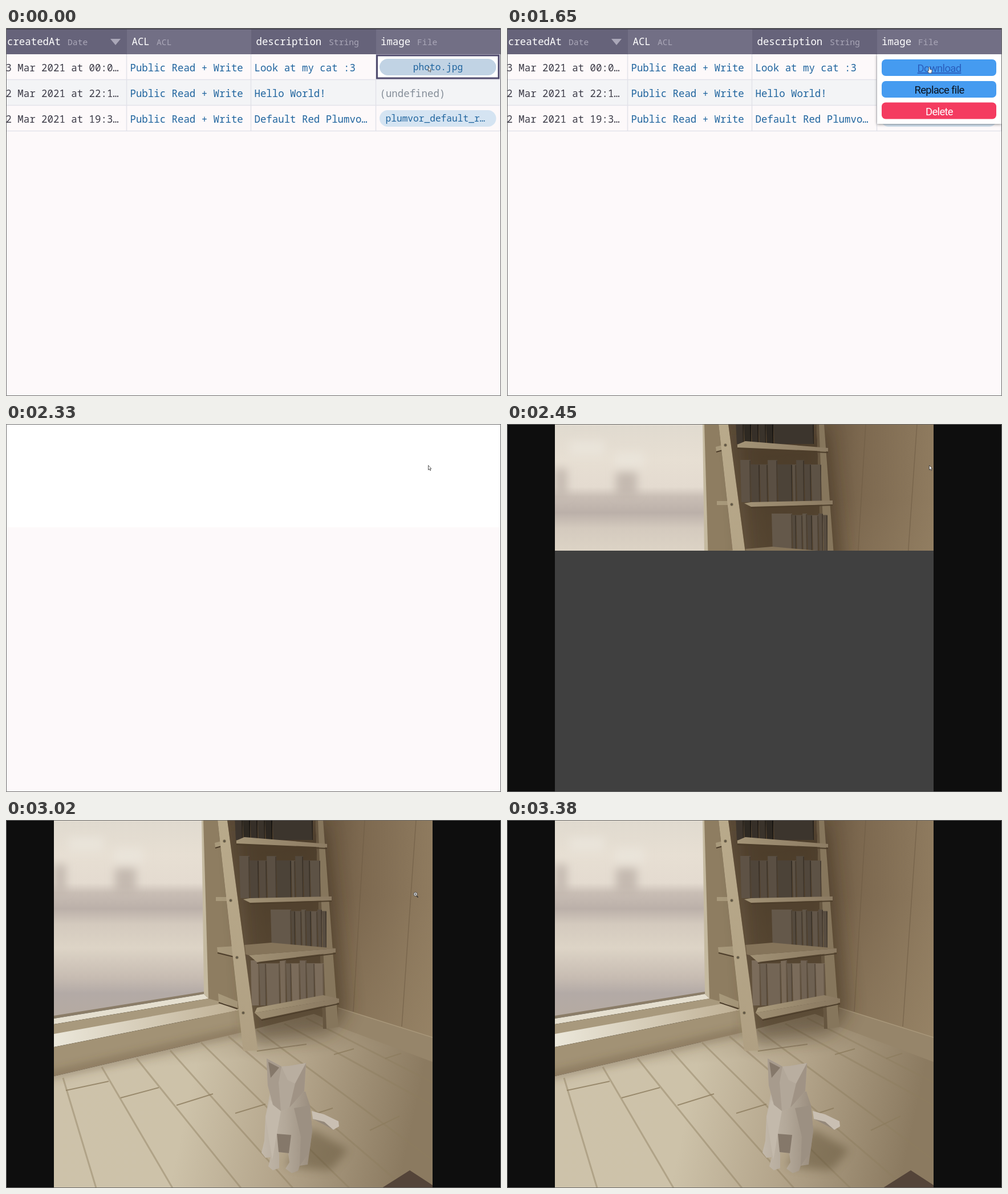
Write an HTML page that moves like this. It is 868 by 645 pixels and loops after 4.41 s.

```html
<!DOCTYPE html>
<html lang="en">
<head>
<meta charset="utf-8">
<title>File column preview</title>
<style>
html, body { margin: 0; width: 100%; height: 100%; overflow: hidden; background: #fdf9fa; }
svg { display: block; width: 100%; height: 100%; }
text { font: 17.4px "Noto Sans Mono", monospace; fill: #1f649e; white-space: pre; }
.head text { fill: #fff; font-weight: 500; }
.head .type { font-size: 14.7px; font-weight: 400; fill: #aaa7b8; }
.date { fill: #3d3c48; }
.none { fill: #848d98; }
.pill { font-size: 16.2px; }
.menu text { font: 18.5px Roboto, sans-serif; letter-spacing: -.7px; text-anchor: middle; fill: #0b1420; }
.menu .link { fill: #2a5fbd; text-decoration: underline; }
.menu .danger { fill: #fff; }

.menu, .blank, .viewer, .pending, .cursor, .arrow, .hand, .lens {
  animation: 4410ms step-end infinite;
}
.menu { animation-name: menu; }
.blank { animation-name: blank; }
.viewer { animation-name: viewer; }
.pending { animation-name: pending; }
.cursor { animation-name: move; }
.arrow { animation-name: arrow; }
.hand { animation-name: hand; }
.lens { animation-name: lens; }

@keyframes menu { 0% { visibility: hidden } 37.415%, 100% { visibility: visible } }
@keyframes blank { 0% { visibility: hidden } 52.834%, 100% { visibility: visible } }
@keyframes viewer { 0% { visibility: hidden } 55.556%, 100% { visibility: visible } }
@keyframes pending { 0% { visibility: hidden } 55.556% { visibility: visible } 58.277%, 100% { visibility: hidden } }
@keyframes arrow {
  0% { visibility: visible } 37.415% { visibility: hidden }
  52.834% { visibility: visible } 61.905%, 100% { visibility: hidden }
}
@keyframes hand { 0% { visibility: hidden } 37.415% { visibility: visible } 52.834%, 100% { visibility: hidden } }
@keyframes lens { 0% { visibility: hidden } 61.905% { visibility: visible } 76.644%, 100% { visibility: hidden } }
@keyframes move {
  0% { transform: translate(740px, 67.5px) }
  46.485% { transform: translate(740px, 72px) }
  65.079% { transform: translate(732px, 76px) }
  68.481% { transform: translate(718px, 130px) }
  71.202% { transform: translate(672px, 300px) }
  73.923%, 100% { transform: translate(607px, 520px) }
}
</style>
</head>
<body>
<svg viewBox="0 0 868 645" preserveAspectRatio="none">
  <defs>
    <linearGradient id="sky" x2="0" y2="1">
      <stop offset="0" stop-color="#e0dacf"/><stop offset=".18" stop-color="#e7dfd3"/>
      <stop offset=".32" stop-color="#e4dbd0"/><stop offset=".37" stop-color="#c9beb5"/>
      <stop offset=".45" stop-color="#bbb0a9"/><stop offset=".53" stop-color="#d4cabe"/>
      <stop offset=".65" stop-color="#ddd4c6"/><stop offset=".8" stop-color="#c7bcb2"/>
      <stop offset=".88" stop-color="#b3aaa6"/><stop offset="1" stop-color="#b5aaa1"/>
    </linearGradient>
    <linearGradient id="wall">
      <stop offset="0" stop-color="#66543e"/><stop offset=".35" stop-color="#7c684f"/><stop offset="1" stop-color="#8f7b5f"/>
    </linearGradient>
    <linearGradient id="wallGlow" x2="0" y2="1">
      <stop offset=".3" stop-color="#a08d6e" stop-opacity="0"/><stop offset="1" stop-color="#a08d6e" stop-opacity=".5"/>
    </linearGradient>
    <linearGradient id="nook" x2="0" y2="1">
      <stop offset="0" stop-color="#5a4a37"/><stop offset=".6" stop-color="#6e5d47"/><stop offset="1" stop-color="#85745a"/>
    </linearGradient>
    <linearGradient id="floor" x2="1" y2=".1">
      <stop offset="0" stop-color="#cdc2aa"/><stop offset=".4" stop-color="#cdc2a9"/>
      <stop offset=".68" stop-color="#b3a48a"/><stop offset="1" stop-color="#8b7a60"/>
    </linearGradient>
    <linearGradient id="floorShade" x2=".2" y2="1">
      <stop offset="0" stop-color="#7d6b4e" stop-opacity=".5"/><stop offset=".35" stop-color="#7d6b4e" stop-opacity="0"/>
    </linearGradient>
    <linearGradient id="sill">
      <stop offset="0" stop-color="#ebe7da"/><stop offset="1" stop-color="#bfb094"/>
    </linearGradient>
    <linearGradient id="rail" x2="0" y2="1">
      <stop offset="0" stop-color="#b9aa8b"/><stop offset="1" stop-color="#b0a083"/>
    </linearGradient>
    <linearGradient id="board">
      <stop offset="0" stop-color="#a99a7c"/><stop offset="1" stop-color="#897860"/>
    </linearGradient>
    <linearGradient id="body">
      <stop offset="0" stop-color="#c2b8aa"/><stop offset=".5" stop-color="#b2a798"/><stop offset="1" stop-color="#998c7d"/>
    </linearGradient>
    <filter id="soft" x="-30%" y="-30%" width="160%" height="160%"><feGaussianBlur stdDeviation="8"/></filter>
    <filter id="gloom" x="-30%" y="-30%" width="160%" height="160%"><feGaussianBlur stdDeviation="16"/></filter>
    <filter id="shadow" x="-10%" y="-10%" width="120%" height="125%">
      <feDropShadow dx="0" dy="1" stdDeviation="2.5" flood-opacity=".45"/>
    </filter>
    <clipPath id="photo"><path d="M84 0H748V645H84Z"/></clipPath>
  </defs>

  <path fill="#fdf9fa" d="M0 0H868V645H0Z"/>
  <path fill="#f3f4f6" d="M0 91H868V135H0Z"/>
  <path stroke="#e2e2e9" stroke-width="1.5" d="M0 90.5H868M0 135.5H868M0 180.5H868M211.5 46V181M429.5 46V181M648.5 46V181M866.5 46V181"/>

  <g class="head">
    <path fill="#66637a" d="M0 1H868V46H0Z"/>
    <path fill="#726f85" d="M212 1H430V46H212ZM649 1H868V46H649Z"/>
    <path fill="#403e49" d="M0 1H868V2.5H0Z"/>
    <path fill="#aaa7b8" d="M183 19H201L192 30Z"/>
    <text x="2" y="30">createdAt</text><text class="type" x="108" y="30">Date</text>
    <text x="220.5" y="30">ACL</text><text class="type" x="264" y="30">ACL</text>
    <text x="438.5" y="30">description</text><text class="type" x="566" y="30">String</text>
    <text x="657" y="30">image</text><text class="type" x="721" y="30">File</text>
  </g>

  <g id="rows"></g>
  <path fill="#fff" stroke="#4f4a6d" stroke-width="3" d="M650.5 48H864V88H650.5Z"/>
  <rect x="655" y="54" width="204.500" height="29" rx="14.500" fill="#c1d3e4"/>
  <rect x="655" y="144" width="204.500" height="29" rx="14.500" fill="#d5e4f2"/>
  <text class="pill" x="757.500" y="74" text-anchor="middle">photo.jpg</text>
  <text class="none" x="655.500" y="120.500">(undefined)</text>
  <text class="pill" x="665.500" y="164">plumvor_default_r…</text>

  <g class="menu">
    <path fill="#fff" filter="url(#shadow)" d="M649 46H867V168H649Z"/>
    <path fill="#726f85" d="M649 40H868V46H649Z"/>
    <g fill="#459bf0">
      <rect x="657" y="55" width="201" height="29" rx="7"/>
      <rect x="657" y="93" width="201" height="29" rx="7"/>
      <rect x="657" y="130.500" width="201" height="29" rx="7" fill="#f43b60"/>
    </g>
    <text class="link" x="758" y="77">Download</text>
    <text x="758" y="115">Replace file</text>
    <text class="danger" x="758" y="152.500">Delete</text>
  </g>

  <g class="blank">
    <path fill="#fdf9fa" d="M0 0H868V645H0Z"/>
    <path fill="#fff" d="M0 0H868V181H0Z"/>
  </g>

  <g class="viewer">
    <path fill="#0e0e0e" d="M0 0H868V645H0Z"/>
    <g clip-path="url(#photo)">
      <path fill="url(#nook)" d="M340 0H575V400H340Z"/>
      <path fill="url(#wall)" d="M550 0H748V440H580Z"/>
      <path fill="url(#wallGlow)" d="M550 0H748V440H580Z"/>
      <path fill="none" stroke="#6f5d45" stroke-opacity=".6" stroke-width="1.500" d="M629 0L609 336M719 0L694 362"/>
      <path fill="#8e7d61" d="M345 0H371L408 335L352 320Z"/>
      <path fill="url(#sky)" d="M84 0H345L348 303L84 345Z"/>
      <g filter="url(#soft)">
        <path fill="#ebe7dc" opacity=".8" d="M110 30H170V55H110ZM190 50H240V75H190Z"/>
        <path fill="#b7aca3" opacity=".7" d="M84 78H105V125H84ZM191 84H228V125H191Z"/>
      </g>
      <path fill="#c5baa0" d="M343 0H346L355 313L347 305Z"/>
      <path fill="#8b7d68" d="M84 343L347 301V305L84 348Z"/>
      <path fill="#e5dfcf" d="M84 348L347 305L355 313L84 358Z"/>
      <path fill="#a8997d" d="M84 358L355 313L385 321L84 376Z"/>
      <path fill="url(#sill)" d="M84 375L383 321L410 333L84 398Z"/>
      <path fill="#a29275" d="M84 398L410 333L414 372L84 449Z"/>
      <path fill="url(#floor)" d="M84 449L414 372L540 340L748 422V645H84Z"/>
      <path fill="url(#floorShade)" d="M84 449L414 372L540 340L748 422V645H84Z"/>
      <path fill="none" stroke="#604e36" stroke-width="9" stroke-opacity=".55" filter="url(#soft)" d="M70 450L414 370"/>
      <path fill="#96856a" d="M582 329L748 381V424L582 362Z"/>
      <path stroke="#a8977a" stroke-width="1.500" d="M582 329L748 381"/>
      <g fill="none" stroke="#8d7c5e">
        <path stroke-width="3" stroke-opacity=".45" d="M100 452L158 645M168 433L292 645M229 418L412 645M288 404L503 645M342 390L602 645M390 379L700 645M440 368L748 596M488 357L748 500M526 347L748 460"/>
        <path stroke-width="2" stroke-opacity=".8" d="M105 474L180 458M201 487L268 469M299 500L363 480M402 514L455 498M638 544L690 519M545 514L573 505M575 411L610 401M665 418L693 409M440 405L527 393"/>
      </g>
      <path fill="#3c2d1c" opacity=".5" filter="url(#gloom)" d="M405 20L560 10L598 335L565 375L430 392Z"/>

      <path fill="#86765c" d="M543 0H556L583 363L556 366Z"/>
      <path fill="#665640" d="M543 0H547L562 366H556Z"/>
      <g id="books"></g>
      <path fill="#85745a" d="M370 223L465 215L578 225L426 237Z"/>
      <g fill="url(#board)">
        <path d="M366 40L378 37V46L367 48ZM404 36L418 30L563 42V48L404 41ZM368 135H392V142H368ZM416 139L428 137L571 134V141L428 145ZM370 223L400 221V239L371 231ZM426 237L578 225V232L440 249ZM372 304L406 318V329L373 318ZM436 338L584 313V320L448 349Z"/>
        <path d="M436 338L440 329L556 307L584 313Z"/>
      </g>
      <path fill="none" stroke="#4d3e2b" stroke-width="2" d="M404 43L563 50M428 147L571 142M440 251L578 234M448 351L584 322M367 49L378 46M371 233L400 240M373 320L406 331"/>
      <path fill="url(#rail)" d="M371 0H388L442 404L416 405Z"/>
      <path fill="#5e4d36" d="M388 0H393L424 262L441 400Z" opacity=".45"/>
      <g fill="#5f5647" stroke="#968767"><circle cx="383" cy="37" r="2.500"/><circle cx="394" cy="141" r="2.500"/><circle cx="405" cy="241" r="2.500"/><circle cx="416" cy="338" r="2.500"/></g>

      <path fill="#59482f" opacity=".45" filter="url(#soft)" d="M490 606L535 540L600 578L570 614L530 612Z"/>
      <path fill="#c9bfb2" d="M536 510L558 516L583 528L584 537L574 543L558 533L538 524Z"/>
      <path fill="#94887a" d="M538 524L558 529L574 543L558 534Z"/>
      <path fill="url(#body)" d="M463 478L455 520L453 562L448 583L455 592L464 591L460 607L468 614L479 610V582L495 584L497 600L490 611L501 619L512 615L515 606L529 604L532 582L537 545L533 500L525 476Z"/>
      <path fill="#85786a" d="M475 550L500 552L496 584L478 582Z"/>
      <path fill="#9c9082" d="M505 505L533 500L537 545L532 582L515 606L517 555Z"/>
      <path fill="#c3b9ab" d="M463 490L482 510L475 550L467 596L455 520Z"/>
      <path fill="#b2a799" d="M457 418L483 432L497 431L526 426L523 475L497 504L482 510L468 499L459 465Z"/>
      <path fill="#a79b8d" d="M457 418L483 432L478 460L482 510L468 499L459 465Z"/>
      <path fill="#b9aea0" d="M483 432L497 431L526 426L507 462L494 456Z"/>
      <path fill="#a09385" d="M526 426L523 475L497 504L507 462Z"/>
      <path fill="#85786a" d="M460 424L479 434L464 452Z"/>
      <path fill="#544439" d="M659 645L708 614L748 640V645Z"/>
    </g>
    <path class="pending" fill="#404040" d="M84 222H748V645H84Z"/>
  </g>

  <path fill="none" stroke="#6a6a6a" d="M.5 .5H867.5V644.5H.5Z"/>

  <g class="cursor">
    <path class="arrow" fill="#fff" stroke="#333" stroke-width=".8" d="M.5 .5V8.500L2.400 6.800L3.700 9.600L4.900 9.100L3.700 6.300H5.800Z"/>
    <path class="hand" fill="#fff" stroke="#333" stroke-width=".7" d="M-.5 1.500Q.5 0 1.500 1.500V5L4.800 5.800Q5.500 6.200 5.300 7.500L4.300 11.800H-.2L-2.700 7.700Q-2.300 6.300-.5 7.700Z"/>
    <g class="lens" fill="#fff" stroke="#333" stroke-width=".9">
      <path stroke-width="1.600" d="M2 3L4.600 5.600"/>
      <circle r="3.200"/>
      <path d="M-1.800 0H1.800M0-1.800V1.800"/>
    </g>
  </g>
</svg>
<script>
const SVG_NS = 'http://www.w3.org/2000/svg';

function add(parent, tag, attrs, content = '') {
  const node = document.createElementNS(SVG_NS, tag);
  for (const [key, value] of Object.entries(attrs)) node.setAttribute(key, value);
  node.textContent = content;
  document.getElementById(parent).append(node);
}

const records = [
  ['3 Mar 2021 at 00:0…', 'Look at my cat :3'],
  ['2 Mar 2021 at 22:1…', 'Hello World!'],
  ['2 Mar 2021 at 19:3…', 'Default Red Plumvo…']
];
records.forEach(([date, description], i) => {
  const y = 75.5 + i * 45;
  add('rows', 'text', { x: -.5, y, class: 'date' }, date);
  add('rows', 'text', { x: 217.5, y }, 'Public Read + Write');
  add('rows', 'text', { x: 435.5, y }, description);
});

// Each shelf: bottom edge, lightness, top edge range, spine edges.
const shelves = [
  { bottom: 35, light: 18, top: -5, vary: 4, edges: [401, 415, 428, 441, 454, 467, 538] },
  { bottom: 137, light: 29, top: 63, vary: 9, edges: [409, 427, 443, 457, 474, 500, 507, 521, 533, 551] },
  { bottom: 228, light: 31, top: 157, vary: 3, edges: [464, 500, 507, 518, 526, 535, 546, 554, 562] },
  { bottom: 325, light: 39, top: 246, vary: 6, edges: [429, 444, 456, 480, 491, 500, 515, 527, 541, 557] }
];
for (const { bottom, light, top, vary, edges } of shelves) {
  edges.slice(1).forEach((right, i) => {
    const left = edges[i];
    const y = top + vary * Math.abs(Math.sin(i * 2.1));
    const shade = light + 3 * Math.cos(i * 2.4);
    add('books', 'path', { d: `M${left} ${y}H${right}V${bottom}H${left + 2}Z`, fill: `hsl(32 15% ${shade}%)` });
    add('books', 'path', { d: `M${right - 2} ${y + 1}H${right}V${bottom}H${right - 1}Z`, fill: `hsl(32 18% ${shade - 8}%)` });
  });
}
</script>
</body>
</html>
```
